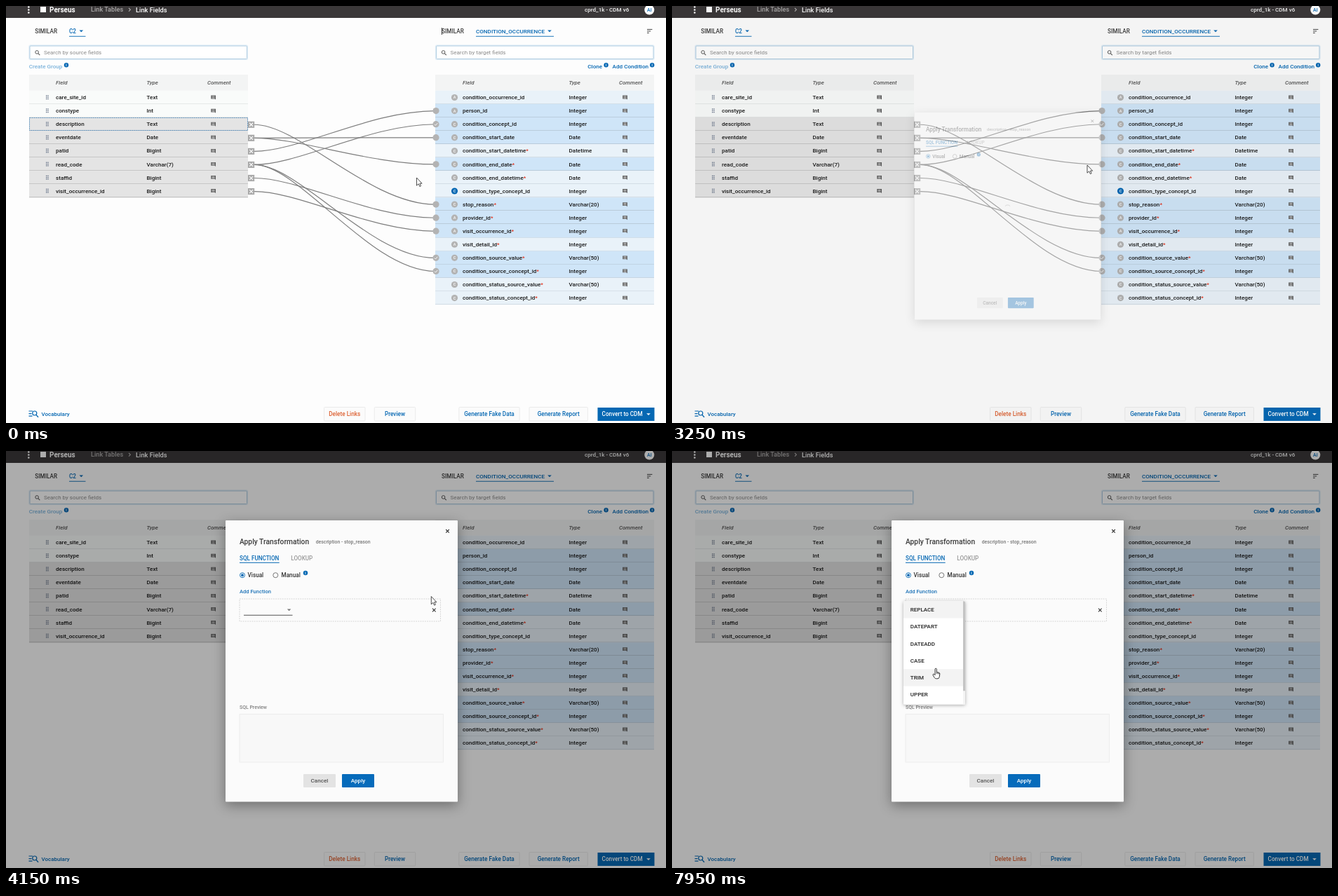
Animation, 941 px wide and 595 px high, one loop 8 s. Source, as an HTML page:

```html
<!DOCTYPE html>
<html lang="en">
<head>
<meta charset="utf-8">
<title>Link Fields</title>
<style>
html, body { margin: 0; width: 100%; height: 100%; overflow: hidden; background: #fdfdfd; }
svg { display: block; width: 941px; height: 595px; font-family: Roboto, sans-serif; font-weight: 500; }
text { white-space: pre; }
.raised { filter: drop-shadow(0 1px 2.5px rgba(0,0,0,.32)); }
.deep { filter: drop-shadow(0 5px 9px rgba(0,0,0,.36)); }
</style>
</head>
<body>
<svg id="stage" viewBox="0 0 941 595" xmlns="http://www.w3.org/2000/svg"></svg>
<script>
const BLUE = '#0668b3', INK = '#1c1c1c';
const PITCH = 19.07, OPTION = 24.26, PANEL_TOP = 214.2, PANEL_H = 147.6, MAX_SCROLL = 22;

// ---------- drawing helpers ----------
const attrs = o => Object.entries(o).map(([k, v]) => ` ${k}="${v}"`).join('');
const text = (x, cy, s, fill = INK, size = 8.1, more = {}) =>
  `<text x="${x}" y="${(cy + size * 0.355).toFixed(2)}" font-size="${size}" fill="${fill}"${attrs(more)}>${s}</text>`;
const mid = { 'text-anchor': 'middle' };
const rect = (x, y, w, h, fill, more = {}) =>
  `<rect x="${x}" y="${y}" width="${w}" height="${h}" fill="${fill}"${attrs(more)}/>`;
const circle = (x, y, r, fill, more = {}) => `<circle cx="${x}" cy="${y}" r="${r}" fill="${fill}"${attrs(more)}/>`;
const path = (d, stroke, w = 1, fill = 'none', more = {}) =>
  `<path d="${d}" stroke="${stroke}" stroke-width="${w}" fill="${fill}"${attrs(more)}/>`;
const group = (id, body, more = {}) => `<g id="${id}"${attrs(more)}>${body}</g>`;
const caret = (x, y, fill) => path(`M${x - 2.8} ${y - 1.4}h5.6l-2.8 2.9z`, 'none', 0, fill);
const cross = (x, y, r, col, w) => path(`M${x - r} ${y - r}l${2 * r} ${2 * r}m0 ${-2 * r}l${-2 * r} ${2 * r}`, col, w);
const info = (x, y) => circle(x, y, 3.2, BLUE) + text(x, y, 'i', '#fff', 5, { ...mid, 'font-weight': 700 });
const rowY = i => 130.3 + PITCH * i;

// ---------- tables ----------
const source = ['care_site_id Text', 'constype Int', 'description Text', 'eventdate Date', 'patid Bigint',
  'read_code Varchar(7)', 'staffid Bigint', 'visit_occurrence_id Bigint'].map(s => s.split(' '));
const target = ['A condition_occurrence_id Integer', 'A person_id Integer', 'C condition_concept_id Integer',
  'C condition_start_date Date', 'C condition_start_datetime* Datetime', 'C condition_end_date* Date',
  'C condition_end_datetime* Date', 'C condition_type_concept_id Integer', 'C stop_reason* Varchar(20)',
  'A provider_id* Integer', 'A visit_occurrence_id* Integer', 'A visit_detail_id* Integer',
  'C condition_source_value* Varchar(50)', 'C condition_source_concept_id* Integer',
  'C condition_status_source_value* Varchar(50)', 'C condition_status_concept_id* Integer'].map(s => s.split(' '));
const links = [[2, 8], [3, 3], [3, 5], [4, 1], [5, 2], [5, 12], [5, 13], [6, 9], [7, 10]];
const checked = [2, 12, 13];

const note = (x, y) => path(`M${x - 3.3} ${y - 2.7}h6.7v6l-1.4-1.2h-5.3z`, 'none', 0, '#5c5c5c') +
  path(`M${x - 2} ${y - 1.5}h4m-4 1.3h4m-4 1.3h4`, '#e8e8e8', 0.6);
const dots = (x, y) => [0, 1, 2].map(r => [0, 1].map(c =>
  rect(x + c * 2.3, y - 3 + r * 2.3, 1.3, 1.3, '#56647c')).join('')).join('');
const head = (x, fx, tx, cx) => rect(x, 98, 312, 22.8, '#f3f4f4') +
  [['Field', fx], ['Type', tx], ['Comment', cx]]
    .map(([s, px]) => text(px, 109.5, s, '#555', 7.9, { 'font-style': 'italic' })).join('');
const band = (x, i, fill, line) => rect(x, rowY(i) - PITCH / 2, 312, PITCH + 0.5, fill) +
  rect(x, Math.round(rowY(i) + PITCH / 2) - 1, 312, 1, line);

function leftTable() {
  return head(33, 71, 200.5, 287) + source.map(([name, type], i) => {
    const y = rowY(i), on = i > 1;
    return band(33, i, on ? '#e4e4e4' : '#f9fbfa', on ? '#c6c6c6' : '#e2e5e4') + dots(57, y) +
      text(71, y, name) + text(200.5, y, type) + note(295.6, y);
  }).join('');
}
function rightTable() {
  const used = new Set(links.map(l => l[1]));
  return head(612, 651, 802.5, 874) + target.map(([kind, name, type], i) => {
    const y = rowY(i), on = used.has(i);
    return band(612, i, on ? '#cfe5f8' : '#e9f2f9', on ? '#b9cbda' : '#d3dde5') +
      circle(639.5, y + 0.2, 4.6, i === 7 ? BLUE : '#b3b3b3') + text(639.5, y + 0.2, kind, '#fff', 5.6, mid) +
      text(651, y, name.replace('*', '<tspan fill="#e0331d">*</tspan>')) + text(802.5, y, type) + note(882.5, y);
  }).join('');
}
function wires() {
  const x1 = 354, x2 = 612, span = x2 - x1;
  const lines = links.map(([a, b]) => {
    const y1 = rowY(a) + 0.8, y2 = rowY(b) + 0.3;
    return path(`M${x1} ${y1}C${x1 + span * 0.25} ${y1} ${x2 - span * 0.36} ${y2} ${x2} ${y2}`, '#7d7d7d', 1.2);
  }).join('');
  const starts = [...new Set(links.map(l => l[0]))].map(a => {
    const y = rowY(a) + 0.8;
    return rect(345, y - 4.6, 9.2, 9.2, '#a9a9a9') + cross(349.6, y, 2.5, '#fff', 1.1);
  }).join('');
  const ends = links.map(([, b]) => {
    const y = rowY(b) + 0.2;
    return circle(613, y, 4.6, '#b3b3b3') +
      (checked.includes(b) ? path(`M610.9 ${y + 0.2}l1.5 1.5 2.9-3.2`, '#fff', 0.9) : '');
  }).join('');
  return lines + starts + ends;
}

// ---------- page ----------
const search = (x, label) =>
  rect(x, 56.5, 310.5, 19.5, '#fff', { stroke: '#e4eff7', 'stroke-width': 2.4, rx: 1.5 }) +
  rect(x + 0.5, 57, 309.5, 18.5, '#fff', { stroke: '#a9c8de', 'stroke-width': 0.9, rx: 1 }) +
  circle(x + 10.6, 65.9, 2.3, 'none', { stroke: '#555', 'stroke-width': 1 }) +
  path(`M${x + 12.3} 67.6l2.5 2.5`, '#555', 1.1) +
  text(x + 20.5, 66.4, label, '#8a8a8a', 8, { 'font-weight': 400 });
const button = (x, w, label, col) =>
  rect(x, 572.5, w, 19.5, '#fbfbfb', { stroke: '#ebebeb', 'stroke-width': 1, rx: 1 }) +
  text(x + w / 2, 582, label, col, 8.2, mid);

function page() {
  return rect(0, 0, 941, 595, '#fdfdfd') + rect(0, 0, 941, 17, '#3b3839') +
    [1.5, 5.5, 9.5].map(y => circle(32.3, y, 1.3, '#fff')).join('') +
    rect(49, 1, 8, 8, '#fff') + text(62, 5, 'Perseus', '#fff', 10, { 'font-weight': 700 }) +
    text(121, 5.2, 'Link Tables', '#a9a7a7', 9.2) + path('M175 2.9l2.4 2.4-2.4 2.4', '#b5b3b3', 1.1) +
    text(185, 5.2, 'Link Fields', '#fff', 9.3) + text(825, 5.5, 'cprd_1k - CDM v6', '#f4f4f4', 8.05) +
    circle(917.3, 5.5, 7, '#fff') + text(917.3, 5.5, 'AI', BLUE, 7, mid) +
    text(41.3, 36.2, 'SIMILAR', '#3a3a3a', 8.2) + text(90, 36, 'C2', BLUE, 8.2) + caret(107.3, 35.8, BLUE) +
    rect(90, 42.8, 23.5, 0.9, BLUE) +
    text(621, 36.2, 'SIMILAR', '#3a3a3a', 8.2) + text(670, 35.8, 'CONDITION_OCCURRENCE', BLUE, 8.1) +
    caret(775, 35.8, BLUE) + rect(670, 42.8, 111, 0.9, BLUE) +
    path('M914 33.4h7.4m-7.4 2.5h5.2m-5.2 2.5h2.8', '#444', 1) +
    rect(621, 31, 0.9, 10, '#222', { id: 'beam' }) +
    search(33.5, 'Search by source fields') + search(613, 'Search by target fields') +
    text(32.7, 86.2, 'Create Group', '#7db4dc') + info(86, 84.2) +
    text(829.3, 86.2, 'Clone', BLUE) + info(855.6, 84.2) +
    text(864.6, 86.2, 'Add Condition', BLUE) + info(921.2, 84.2) +
    leftTable() + rightTable() + wires() +
    rect(33.5, 159.5, 311, 18, 'none', { id: 'focus', stroke: '#5f93bf', 'stroke-width': 1, 'stroke-dasharray': '2 1' }) +
    path('M32.5 578h5.5m-5.5 3.6h4m-4 3.6h5', BLUE, 1.2) +
    circle(40.8, 581, 3, 'none', { stroke: BLUE, 'stroke-width': 1.2 }) + path('M43 583.4l3 3.3', BLUE, 1.4) +
    text(50.5, 582, 'Vocabulary', BLUE, 8) +
    button(453.5, 58.5, 'Delete Links', '#dd6233') + button(525.3, 58.4, 'Preview', BLUE) +
    button(645.8, 86.4, 'Generate Fake Data', BLUE) + button(746, 83.4, 'Generate Report', BLUE) +
    rect(843.5, 573, 81, 19, BLUE) + text(849.6, 582, 'Convert to CDM', '#fff', 8.2) + caret(916, 582.6, '#fff');
}

// ---------- overlays ----------
function popup() {
  const box = y => rect(543.8, y - 4.7, 9.4, 9.4, '#fcfcfc', { stroke: '#ececec', 'stroke-width': 0.9 });
  return rect(530, 186, 89.5, 87, '#fafafa', { rx: 1.5, class: 'raised' }) +
    text(541.5, 203.5, 'Transformation', '#333') + box(225.8) + text(559, 225.8, 'SQL Function', '#555') +
    box(247) + text(559, 247, 'Lookup', '#8c8c8c');
}
function dialog() {
  const top = cross(629.5, 114.3, 2.3, '#333', 1.1) +
    text(333, 129.6, 'Apply Transformation', '#3c3c3c', 10.28) +
    text(441.7, 129.6, 'description - stop_reason', '#777', 6.88) +
    text(333, 152.8, 'SQL FUNCTION', BLUE, 8.15) + rect(333, 158.8, 56.7, 1, BLUE) +
    text(406.3, 152.8, 'LOOKUP', '#999', 8.15) +
    circle(337, 177.2, 3.5, '#fff', { stroke: BLUE, 'stroke-width': 0.9 }) + circle(337, 177.2, 1.9, BLUE) +
    text(344.5, 177.2, 'Visual', '#333', 8.2) +
    circle(384.3, 177.2, 3.5, '#fff', { stroke: '#666', 'stroke-width': 0.9 }) +
    text(392.5, 177.2, 'Manual', '#333', 8.2) + info(427, 174);
  const body = text(333, 200.4, 'Add Function', '#1f74b8', 7.6) +
    rect(333, 211, 286.5, 32, 'none', { stroke: '#c9c9c9', 'stroke-width': 0.8, 'stroke-dasharray': '1.8 1.4' }) +
    rect(339, 233.8, 69.5, 0.9, '#444') + caret(403.6, 226.8, '#777') + cross(610.3, 227, 2.3, '#333', 1.1) +
    text(333, 365.2, 'SQL Preview', '#808080', 6.93) +
    rect(333, 375.5, 290.5, 68.5, '#f8f8f8', { stroke: '#ececec', 'stroke-width': 0.9 });
  const foot = rect(424, 461, 46, 19, '#e3e3e3', { rx: 1 }) + text(447, 470.6, 'Cancel', '#555', 8.1, mid) +
    rect(479, 461, 46, 19, '#066bbb', { rx: 1 }) + text(502, 470.6, 'Apply', '#fff', 8.1, mid);
  return rect(313, 99, 331, 401.5, '#fbfbfb', { id: 'sheet', class: 'deep', rx: 1 }) + group('top', top) +
    group('body', body) + path('M474 282a6 6 0 0 1 9 0', '#888', 1, 'none', { id: 'spin' }) + group('foot', foot);
}
const options = ['REPLACE', 'DATEPART', 'DATEADD', 'CASE', 'TRIM', 'UPPER', 'LOWER'];
function panel() {
  const row = (i, fill, id) => rect(330, PANEL_TOP + i * OPTION, 88, OPTION, fill, { id });
  const list = row(0, '#f3f3f3', 'active') + row(0, '#f3f3f3', 'hover') +
    options.map((s, i) => text(339.8, PANEL_TOP + (i + 0.5) * OPTION, s, '#222', 8)).join('');
  return rect(330, PANEL_TOP, 88, PANEL_H, '#fff', { rx: 1.5, class: 'raised' }) +
    `<clipPath id="clip">${rect(330, PANEL_TOP, 88, PANEL_H, '#000', { rx: 1.5 })}</clipPath>` +
    `<g clip-path="url(#clip)">${group('list', list)}${rect(415, PANEL_TOP, 3, PANEL_H, '#f4f4f4')}` +
    `${rect(415, PANEL_TOP, 3, 128, '#c4c4c4', { id: 'thumb' })}</g>`;
}
const arrow = path('M0 0V11.2L2.6 8.8 4.4 12.6 6.1 11.8 4.4 8.2H7.6Z', '#222', 0.8, '#fff');
const hand = path('M-1.2 8V1a1.1 1.1 0 0 1 2.2 0V5.2L4.5 6Q5.7 6.4 5.5 8L4.9 12Q4.5 14.5 2.6 14.5H.2' +
  'Q-1.2 14.5-2 13.2L-4.2 9.6Q-4.7 8.4-3.6 8Q-2.4 7.8-1.2 9.4Z', '#222', 0.9, '#fff') +
  path('M1 5.4v2.4m1.7-2v2.2m1.6-1.8v2', '#222', 0.7);

const stage = document.getElementById('stage');
stage.innerHTML = page() + group('popup', popup()) + rect(0, 0, 941, 595, '#000', { id: 'shade' }) +
  group('dialog', dialog()) + group('panel', panel()) + group('cursor', group('arrow', arrow) + group('hand', hand));
const el = {};
stage.querySelectorAll('[id]').forEach(n => el[n.id] = n);

// ---------- motion ----------
const LOOP = 8000;
const clamp = v => Math.min(1, Math.max(0, v));
const smooth = v => v * v * (3 - 2 * v);
const mix = (a, b, k) => a + (b - a) * k;

function bezier(x1, y1, x2, y2) {
  const at = (a, b, u) => 3 * a * u * (1 - u) ** 2 + 3 * b * u * u * (1 - u) + u ** 3;
  return x => {
    if (x <= 0 || x >= 1) return clamp(x);
    let lo = 0, hi = 1;
    for (let i = 0; i < 30; i++) {
      const u = (lo + hi) / 2;
      if (at(x1, x2, u) < x) lo = u; else hi = u;
    }
    return at(y1, y2, lo);
  };
}
const decel = bezier(0, 0, 0.2, 1), swift = bezier(0.25, 0.8, 0.25, 1);

const track = [
  [0, 585.5, 245], [130, 585.5, 245], [640, 619, 280.5], [880, 614.5, 283], [1890, 614.5, 283],
  [2590, 592, 227], [3750, 592, 227], [3850, 598, 241], [4000, 598, 241], [4150, 606.3, 207.5],
  [4230, 604, 200.5], [4700, 404.5, 228], [5250, 404.5, 228], [5700, 403, 282], [6150, 401.5, 261],
  [6250, 401.5, 261], [6450, 382, 316], [7300, 382, 316], [7350, 381, 315.5], [7700, 381, 315.5],
  [7950, 376.3, 310.3], [LOOP, 376.3, 310.3]];
function pointer(t) {
  const i = track.findIndex((k, n) => n && t <= k[0]);
  const [a, b] = [track[i - 1], track[i]];
  const k = smooth((t - a[0]) / (b[0] - a[0]));
  return [mix(a[1], b[1], k), mix(a[2], b[2], k)];
}
// the picture advances in steps of 50 ms
function step(t) {
  const off = t < 1900 ? 30 : t < 3200 ? 40 : 0;
  return Math.max(0, Math.floor((t - off) / 50) * 50 + off);
}
const show = (node, on) => node.setAttribute('visibility', on ? 'visible' : 'hidden');
const shift = (node, y) => node.setAttribute('transform', `translate(0 ${y})`);

function draw(time) {
  const t = step(time);
  const [x, y] = pointer(t);
  const onHand = (t >= 2340 && t < 3235) || t >= 4650;
  el.cursor.setAttribute('transform', `translate(${x} ${y})`);
  el.arrow.style.display = onHand ? 'none' : '';
  el.hand.style.display = onHand ? '' : 'none';

  show(el.focus, t < 1480);
  show(el.beam, t < 2040);
  show(el.popup, t >= 1480 && t < 3200);

  el.shade.setAttribute('opacity', 0.32 * swift(clamp((t - 3236) / 400)));
  const open = decel(clamp((t - 3233) / 150)), s = mix(0.7, 1, open);
  el.dialog.style.display = open ? '' : 'none';
  el.dialog.setAttribute('opacity', open);
  el.dialog.setAttribute('transform', `translate(478.5 299.7) scale(${s}) translate(-478.5 -299.7)`);
  const pad = t < 3300 ? 16 : 0;
  el.body.style.display = pad ? 'none' : '';
  el.spin.style.display = pad ? '' : 'none';
  el.sheet.setAttribute('y', 99 + pad);
  el.sheet.setAttribute('height', 401.5 - 2 * pad);
  shift(el.top, pad);
  shift(el.foot, -pad);

  const drop = decel(clamp((t - 4980) / 120));
  el.panel.style.display = drop ? '' : 'none';
  el.panel.setAttribute('opacity', drop);
  el.panel.setAttribute('transform',
    `translate(0 ${PANEL_TOP}) scale(1 ${mix(0.8, 1, drop)}) translate(0 ${-PANEL_TOP})`);
  const scroll = MAX_SCROLL * (smooth(clamp((t - 5500) / 250)) - smooth(clamp((t - 6650) / 200)));
  shift(el.list, -scroll);
  shift(el.thumb, scroll / MAX_SCROLL * (PANEL_H - 128));
  const row = t >= 6450 && t < 7150 ? 5 : Math.floor((y + 1.5 - PANEL_TOP + scroll) / OPTION);
  el.hover.setAttribute('y', PANEL_TOP + Math.min(6, Math.max(0, row)) * OPTION);
}

const start = performance.now();
function tick() {
  draw((performance.now() - start) % LOOP);
  requestAnimationFrame(tick);
}
tick();
</script>
</body>
</html>
```
